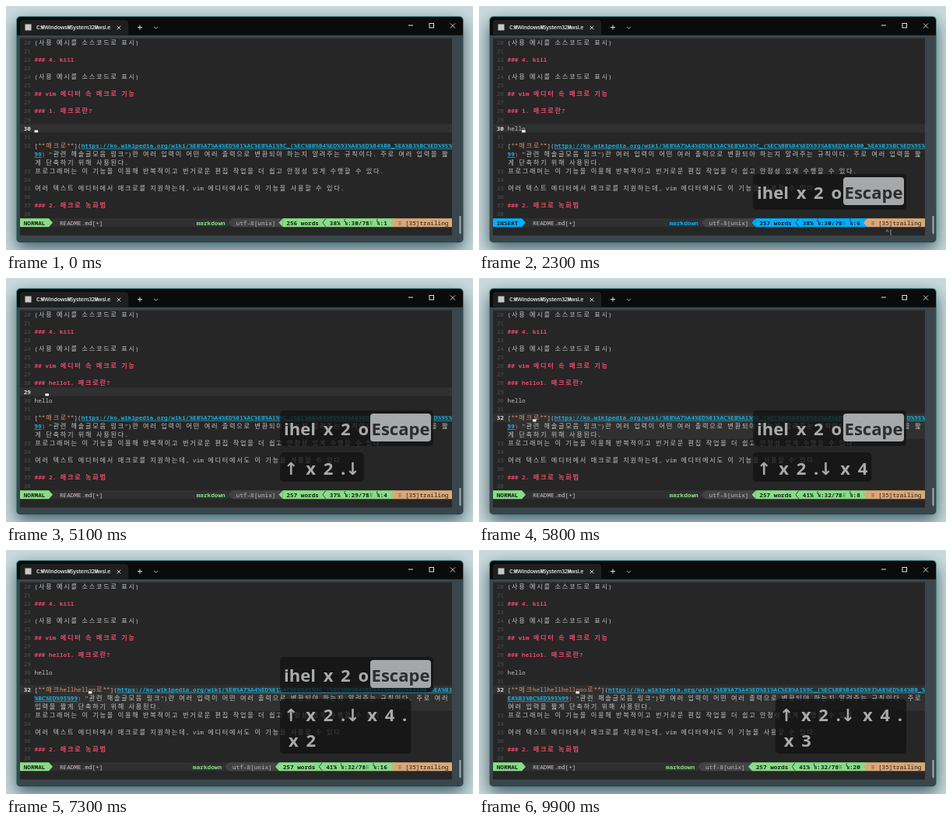
An HTML page with a canvas for the animation above (10 s loop, 600x315 px).

```html
<!DOCTYPE html>
<html lang="ko">
<head>
<meta charset="utf-8">
<style>
html, body { margin: 0; width: 100%; height: 100%; overflow: hidden; background: #cbdcde; }
canvas { display: block; width: 600px; height: 315px; }
</style>
</head>
<body>
<canvas id="stage" width="600" height="315"></canvas>
<script>
const ctx = document.getElementById('stage').getContext('2d');
const LOOP = 10000, LEFT = 18, TOP = 41.5, CW = 4.625, RH = 11.08, COLS = 120, GUTTER = 4;
const MONO = '"Noto Sans Mono", "DejaVu Sans Mono", monospace';
const HANGUL = '"Noto Sans CJK KR", "Noto Sans CJK", sans-serif';
const KEYS = '"Open Sans", "DejaVu Sans", sans-serif';
const C = {
  bg: '#262626', slate: '#3a464b', line: '#303030', text: '#c4c4c4', dim: '#505050',
  head: '#ec4a6a', link: '#1fadd8', bold: '#d98f66', green: '#87dd87', blue: '#00afff',
  warn: '#dba878', ink: '#1c1c1c', mid: '#303030', util: '#434343'
};
const URL_TEXT = 'https://ko.wikipedia.org/wiki/' + encodeURIComponent('매크로') + '_(' +
  encodeURIComponent('컴퓨터') + '_' + encodeURIComponent('과학');

const colX = c => LEFT + c * CW;
const rowY = r => TOP + r * RH;
const isWide = ch => ch >= '\uac00' && ch <= '\ud7a3';
const cells = s => [...s].reduce((n, ch) => n + (isWide(ch) ? 2 : 1), 0);

function rect(x, y, w, h, color) {
  ctx.fillStyle = color;
  ctx.fillRect(x, y, w, h);
}

function round(x, y, w, h, r, color) {
  ctx.fillStyle = color;
  ctx.beginPath();
  ctx.roundRect(x, y, w, h, r);
  ctx.fill();
}

function stroke(color, width, ...pts) {
  ctx.strokeStyle = color;
  ctx.lineWidth = width;
  ctx.beginPath();
  pts.forEach(([x, y], i) => i ? ctx.lineTo(x, y) : ctx.moveTo(x, y));
  ctx.stroke();
}

function cross(x, y, r) {
  stroke('#e4e4e4', 0.9, [x - r, y - r], [x + r, y + r]);
  stroke('#e4e4e4', 0.9, [x - r, y + r], [x + r, y - r]);
}

function glyph(ch, col, row, color, weight = 500) {
  const wide = isWide(ch), y = rowY(row) + RH / 2;
  ctx.font = wide ? `${weight} 8.2px ${HANGUL}` : `${weight} 7.7px ${MONO}`;
  ctx.textAlign = 'center';
  ctx.textBaseline = 'alphabetic';
  ctx.fillStyle = color;
  ctx.fillText(ch, colX(col) + CW * (wide ? 1 : 0.5), y + 2.8);
}

function put(str, col, row, color, weight) {
  for (const ch of str) {
    if (ch !== ' ') glyph(ch, col, row, color, weight);
    col += cells(ch);
  }
}

// Draws coloured spans with hard wrapping; returns the number of rows used.
function putSpans(spans, row) {
  const first = row;
  let col = GUTTER;
  for (const [str, color, weight, under] of spans) {
    for (const ch of str) {
      const w = cells(ch);
      if (col + w > COLS) { col = GUTTER; row++; }
      if (under) rect(colX(col), rowY(row) + 9.4, CW * w, 0.8, color);
      if (ch !== ' ') glyph(ch, col, row, color, weight);
      col += w;
    }
  }
  return row - first + 1;
}

// Last entry whose time has come.
const at = (t, list) => list.reduce((v, [time, next]) => t >= time ? next : v, list[0][1]);

function stateAt(t) {
  const typed = at(t, [[0, 0], [700, 1], [900, 2], [1000, 3], [1200, 4], [1400, 5]]);
  const dots = at(t, [[0, 0], [6300, 1], [7000, 2], [7400, 3]]);
  const [row, col] = at(t, [
    [0, [30, typed]], [2300, [30, 4]], [3400, [29, 3]], [3700, [28, 4]], [4300, [28, 8]],
    [4900, [29, 3]], [5300, [30, 4]], [5500, [31, 0]], [5700, [32, 7]],
    [6300, [32, 11]], [7000, [32, 15]], [7400, [32, 19]]
  ]);
  const insert = t >= 600 && t < 2400;
  return {
    row, col, insert,
    hello: 'hello'.slice(0, typed),
    repeated: 'hell'.repeat(dots) + 'o'.repeat(dots),
    heading: t >= 4300 ? 'hello' : '',
    words: t >= 1700 ? 257 : 256,
    shownCol: t >= 2300 && insert ? 6 : col + 1,
    pending: t >= 2300 && t < 2400,
    keys: at(t, [[0, ''], [600, 'i'], [700, 'ih'], [900, 'ihe'], [1000, 'ihel'],
      [1200, 'ihel x 2'], [1400, 'ihel x 2 o']]),
    escape: t >= 2300,
    fade: Math.max(0, Math.min(1, (7900 - t) / 600)),
    gone: t >= 8300,
    moves: at(t, [[0, ''], [3700, '↑'], [3900, '↑ x 2'], [4300, '↑ x 2 .'], [4900, '↑ x 2 .↓'],
      [5300, '↑ x 2 .↓ x 2'], [5500, '↑ x 2 .↓ x 3'], [5700, '↑ x 2 .↓ x 4'],
      [6300, '↑ x 2 .↓ x 4 .']]),
    times: at(t, [[0, ''], [7000, 'x 2'], [7400, 'x 3']])
  };
}

function drawWindow() {
  rect(0, 0, 600, 315, '#cbdcde');
  ctx.save();
  ctx.shadowColor = 'rgba(10,40,45,.7)';
  ctx.shadowBlur = 22;
  ctx.shadowOffsetY = 8;
  round(13.3, 13.3, 574.4, 292.2, 5, '#2c7474');
  ctx.restore();
  round(14, 14, 573, 290.7, 5, '#0a0b0c');
  round(14, 37.7, 573, 267, [0, 0, 5, 5], C.slate);
  round(18, 18, 139, 19.7, [4, 4, 0, 0], '#1d1f20');

  rect(24.5, 23.5, 8, 8, '#c8c8c8');
  ctx.save();
  ctx.beginPath();
  ctx.rect(38, 20, 96, 17);
  ctx.clip();
  ctx.font = '600 7px "Open Sans", "Noto Sans CJK KR", sans-serif';
  ctx.letterSpacing = '-0.15px';
  ctx.textAlign = 'left';
  ctx.textBaseline = 'alphabetic';
  ctx.fillStyle = '#f0f0f0';
  ctx.fillText('C:₩Windows₩System32₩wsl.exe', 39, 30.4);
  ctx.restore();
  cross(145, 28, 2.3);
  stroke('#ddd', 1, [169, 27.5], [175, 27.5]);
  stroke('#ddd', 1, [172, 24.5], [172, 30.5]);
  stroke('#ccc', 0.9, [190.2, 27], [192.5, 29.2], [194.8, 27]);
  stroke('#e4e4e4', 1, [517, 25], [523, 25]);
  ctx.strokeRect(544, 22.5, 5.5, 5.5);
  cross(574, 25.5, 3);
  rect(582.5, 271, 2, 23, '#a4adb0');
}

function drawBuffer(s) {
  rect(LEFT, TOP, COLS * CW, rowY(23) - TOP, C.bg);
  const plain = str => [[str, C.text]];
  const head = str => [[str, C.head, 700]];
  const lines = [
    plain('(사용 예시를 소스코드로 표시)'), [], head('### 4. kill'), [],
    plain('(사용 예시를 소스코드로 표시)'), [], head('## vim 에디터 속 매크로 기능'), [],
    head(`### ${s.heading}1. 매크로란?`), [], plain(s.hello), [],
    [
      ['[', C.text], [`**매크${s.repeated}로**`, C.bold], ['](', C.text],
      [URL_TEXT, C.link, 600, true], [')', C.head],
      [' "관련 해솔글모음 링크")란 여러 입력이 어떤 여러 출력으로 변환되야 하는지 알려주는 규칙이다. ' +
        '주로 여러 입력을 짧게 단축하기 위해 사용된다.', C.text]
    ],
    plain('프로그래머는 이 기능을 이용해 반복적이고 번거로운 편집 작업을 더 쉽고 안정성 있게 수행할 수 있다.'), [],
    plain('여러 텍스트 에디터에서 매크로를 지원하는데, vim 에디터에서도 이 기능을 사용할 수 있다.'), [],
    head('### 2. 매크로 녹화법'), []
  ];
  let row = 0;
  lines.forEach((spans, i) => {
    const n = 20 + i, here = n === s.row;
    if (here) {
      rect(LEFT, rowY(row), GUTTER * CW, RH, C.line);
      rect(colX(GUTTER), rowY(row), (COLS - GUTTER) * CW, RH * (n === 32 ? 3 : 1), C.line);
    }
    put(String(n), 1, row, here ? '#e0e0e0' : C.dim, here ? 700 : 400);
    const used = putSpans(spans, row);
    if (here) rect(colX(GUTTER + s.col), rowY(row) + 8, CW, 3, '#f4f4f4');
    row += used;
  });
}

function wedge(col, dir, color) {
  const y = rowY(21), a = colX(dir > 0 ? col : col + 1), b = a + dir * (CW + 0.4);
  ctx.fillStyle = color;
  ctx.beginPath();
  ctx.moveTo(a, y);
  ctx.lineTo(b, y + RH / 2);
  ctx.lineTo(a, y + RH);
  ctx.fill();
}

function lineSign(col) {
  ctx.font = `700 5px ${MONO}`;
  ctx.textAlign = 'center';
  ctx.fillStyle = C.ink;
  ctx.fillText('L', colX(col) + 1.6, rowY(21) + 5.3);
  ctx.fillText('N', colX(col) + 3, rowY(21) + 9.3);
}

function bars(col, color) {
  for (let i = 0; i < 3; i++) rect(colX(col) + 0.6, rowY(21) + 4 + i * 1.8, 3.6, 0.7, color);
}

function drawStatus(s) {
  const R = 21, y = rowY(R), accent = s.insert ? C.blue : C.green;
  const band = (from, to, color) => rect(colX(from), y, (to - from) * CW, RH, color);
  const shift = String(s.shownCol).length - 1;
  const p = c => c - shift;

  band(0, COLS, C.mid);
  band(0, 8, accent);
  wedge(8, 1, accent);
  put(s.insert ? 'INSERT' : 'NORMAL', 1, R, C.ink, 600);
  put('README.md[+]', 11, R, '#c8c8c8');
  put('markdown', p(49), R, accent, 600);
  wedge(p(58), -1, C.util);
  band(p(59), p(73), C.util);
  put('utf-8[unix]', p(60), R, '#b8b8b8');
  wedge(p(72), -1, accent);
  band(p(73), 104, accent);
  put(s.words + ' words', p(74), R, C.ink, 600);
  const x = colX(p(84));
  stroke(C.ink, 0.8, [x + 4.2, y + 0.5], [x + 0.4, y + RH / 2], [x + 4.2, y + RH - 0.5]);
  put(Math.floor(s.row * 100 / 78) + '%', p(86), R, C.ink, 600);
  lineSign(p(90));
  put(`:${s.row}/78`, p(91), R, C.ink, 600);
  bars(p(97), '#3f6a42');
  lineSign(p(99));
  put(':' + s.shownCol, p(100), R, C.ink, 600);
  wedge(103, -1, C.warn);
  band(104, COLS, C.warn);
  bars(105, '#6d543c');
  put('[35]trailing', 107, R, C.ink);
  if (s.pending) put('^[', 109, 22, C.text);
}

function drawKeys(s) {
  const RIGHT = 549, BOTTOM = 263, PAD = 5, CHIP = 78;
  ctx.font = `700 22px ${KEYS}`;
  ctx.textAlign = 'left';
  ctx.textBaseline = 'alphabetic';
  ctx.wordSpacing = '4px';
  const width = str => ctx.measureText(str).width;
  const panel = (x, y, w, h) => round(x, y, w, h, 5, 'rgba(18,18,18,.74)');
  const label = (str, x, mid, color = '#a8abac') => {
    ctx.fillStyle = color;
    ctx.fillText(str, x, mid + 7.5);
  };

  const firstW = s.keys && !s.gone ? width(s.keys) + PAD * 2 + (s.escape ? CHIP : 0) : 0;
  const movesW = s.moves ? width(s.moves) + PAD * 2 : 0;
  const left = RIGHT - Math.max(firstW, movesW);
  let bottom = BOTTOM;

  if (s.moves) {
    const h = s.times ? 71 : 38, top = bottom - h;
    panel(left, top, movesW, h);
    label(s.moves, left + PAD, top + 21.5);
    if (s.times) label(s.times, left + PAD + 6, top + 54);
    bottom = top - 8;
  }
  if (firstW && s.fade) {
    const h = s.escape ? 46 : 38, top = bottom - h, mid = top + (s.escape ? 24 : 20);
    ctx.globalAlpha = s.fade;
    panel(left, top, firstW, h);
    label(s.keys, left + PAD, mid);
    if (s.escape) {
      const x = RIGHT - CHIP - 3;
      round(x, top + 4, CHIP, 36, 4, 'rgba(200,203,205,.8)');
      label('Escape', x + (CHIP - width('Escape')) / 2, mid, '#2c2d2e');
    }
    ctx.globalAlpha = 1;
  }
  ctx.wordSpacing = '0px';
}

function frame() {
  const t = Math.floor(performance.now() % LOOP / 100) * 100;
  const s = stateAt(t);
  drawWindow();
  drawBuffer(s);
  drawStatus(s);
  drawKeys(s);
  requestAnimationFrame(frame);
}
frame();
</script>
</body>
</html>
```
